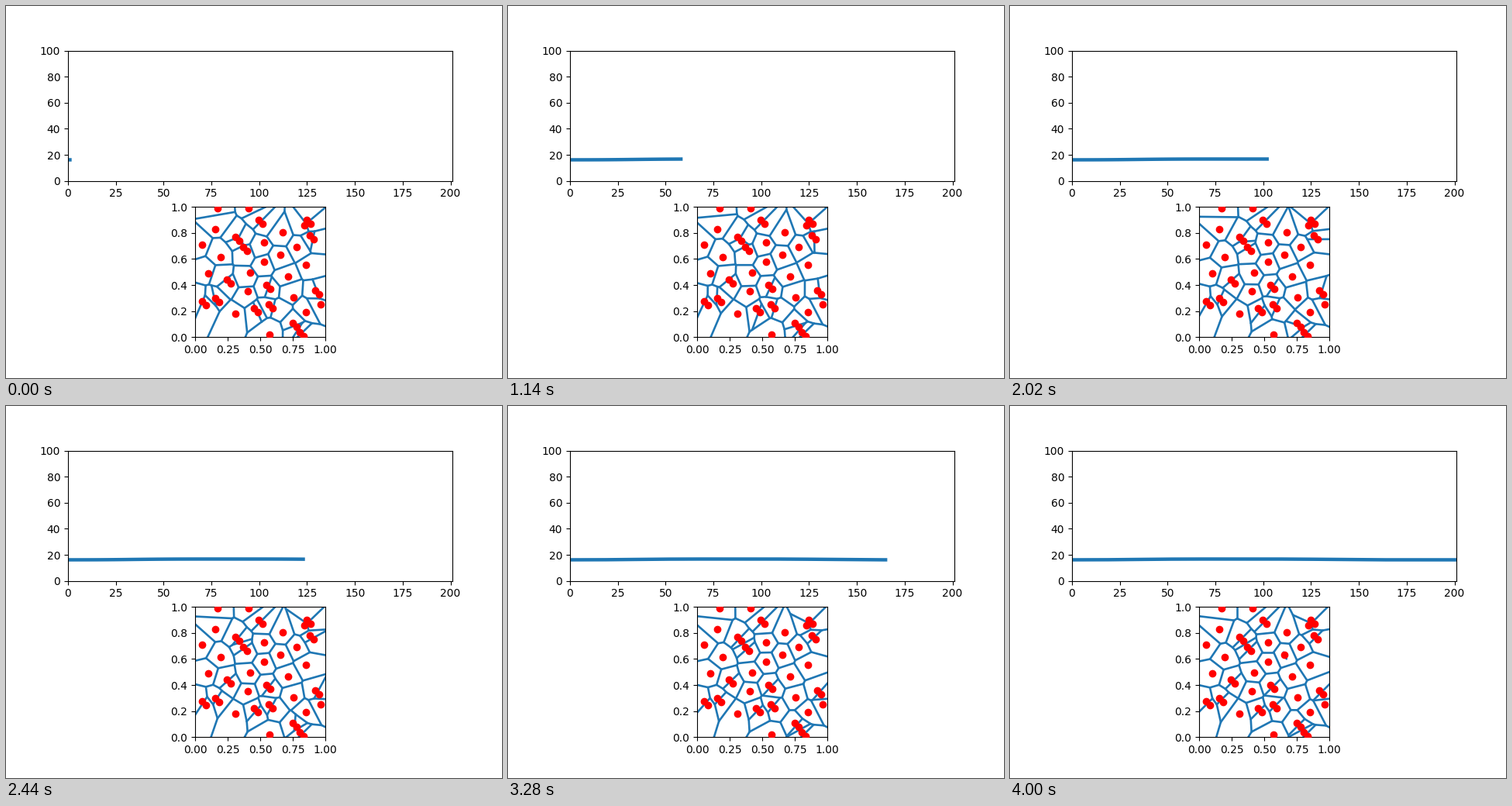
Animation, 640 px wide and 480 px high, one loop 4.02 s. Source, as a matplotlib script:

```python
import numpy as np
import matplotlib.pyplot as plt
from matplotlib.animation import FuncAnimation
from matplotlib.collections import LineCollection

FRAMES = 201
DOTS = 49

# Key dots; each of the close pairs has a partner just below and to the right
singles = [(.175, .99), (.41, .99), (.053, .709), (.84, .86), (.964, .25),
           (.57, .02)]
pairs = [(.31, .77), (.37, .69), (.245, .443), (.55, .40), (.566, .252),
         (.858, .90), (.88, .78), (.925, .36), (.752, .11), (.806, .035),
         (.053, .277), (.486, .90), (.45, .22), (.155, .30)]


def scatter_dots():
    """Place the key dots, then fill the widest gaps one dot at a time."""
    pairs_xy = np.array(pairs)
    dots = np.vstack([singles, pairs_xy, pairs_xy + (.03, -.03)])
    gx, gy = np.meshgrid(np.linspace(.1, .92, 60), np.linspace(.18, .85, 60))
    spots = np.column_stack([gx.ravel(), gy.ravel()])
    while len(dots) < DOTS:
        gaps = np.linalg.norm(spots[:, None] - dots, axis=2).min(axis=1)
        dots = np.vstack([dots, spots[gaps.argmax()]])
    return dots


goals = scatter_dots()
offsets = np.random.default_rng(4).normal(0, .025, goals.shape)
first, second = np.triu_indices(DOTS, 1)

steps = np.arange(FRAMES + 1)
score = 16.15 + .6 * np.exp(-((steps - 85) / 55) ** 4)


def sites_at(n):
    """Cell sites ease from a random offset onto their dots."""
    left = (1 + np.cos(np.pi * n / (FRAMES - 1))) / 2
    return goals + left * offsets


def voronoi_edges(p):
    """Trim the bisector of every pair of sites against all other sites."""
    a, b = p[first], p[second]
    mid = (a + b) / 2
    along = np.stack([a[:, 1] - b[:, 1], b[:, 0] - a[:, 0]], axis=1)
    along /= np.linalg.norm(along, axis=1, keepdims=True)
    to = p[None] - a[:, None]
    sq = (p ** 2).sum(axis=1)
    rate = 2 * np.einsum('mnk,mk->mn', to, along)
    room = sq[None] - sq[first][:, None] - 2 * np.einsum('mnk,mk->mn', to, mid)
    flat = np.abs(rate) < 1e-12
    t = room / np.where(flat, 1, rate)
    hi = np.where((rate > 0) & ~flat, t, 4).min(axis=1)
    lo = np.where((rate < 0) & ~flat, t, -4).max(axis=1)
    keep = hi > lo
    ends = [mid[keep] + s[keep, None] * along[keep] for s in (lo, hi)]
    return np.stack(ends, axis=1)


fig, (top, low) = plt.subplots(2, 1, figsize=(6.4, 4.8), dpi=100)
top.set_xlim(0, FRAMES)
top.set_ylim(0, 100)
trace, = top.plot([], [], color='C0', lw=3.2)

low.set_aspect('equal')
low.set_xlim(0, 1)
low.set_ylim(0, 1)
cells = LineCollection([], colors='C0', linewidths=1.9, capstyle='round')
low.add_collection(cells, autolim=False)
low.plot(goals[:, 0], goals[:, 1], 'ro', zorder=3)


def update(n):
    trace.set_data(steps[:n + 2], score[:n + 2])
    cells.set_segments(voronoi_edges(sites_at(n)))
    return trace, cells


anim = FuncAnimation(fig, update, frames=FRAMES, interval=20,
                     repeat=True, repeat_delay=0)
plt.show()
```
